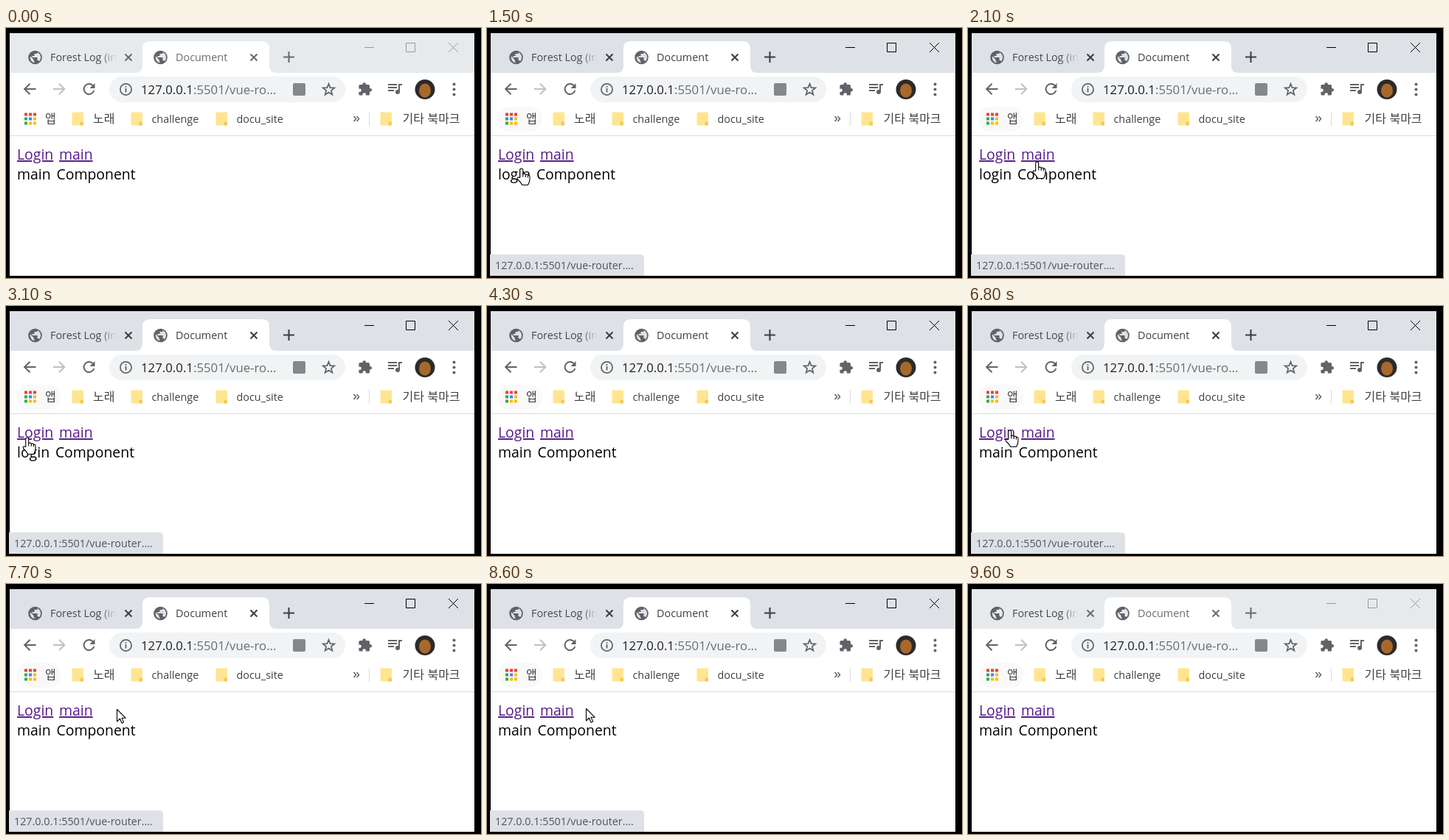
Animation, 644 px wide and 340 px high, one loop 9.7 s. Source, as an HTML page:

```html
<!DOCTYPE html>
<html lang="ko">
<head>
<meta charset="utf-8">
<style>
  html, body { margin: 0; width: 100%; height: 100%; overflow: hidden; background: #000; }
  svg {
    display: block;
    --bar: #dee1e6; --title: #3c4043; --control: #000;
    font: 14.4px "Open Sans", "Noto Sans CJK KR", "Noto Sans CJK", sans-serif;
    fill: #3c4043;
  }
  svg.inactive { --bar: #e7eaed; --title: #696d71; --control: #999; }
  .korean { font: 16px "Noto Sans CJK KR", "Noto Sans CJK", sans-serif; }
  .page { font-size: 19.4px; word-spacing: 2.8px; fill: #000; }
  .link { fill: #551a8b; text-decoration: underline; }
  .bar { fill: var(--bar); }
  .icon { fill: #5f6368; }
  .stroke { fill: none; stroke: #5f6368; stroke-width: 2; }
  .line { fill: none; stroke: var(--control); }
  .cross { fill: none; stroke: var(--title); stroke-width: 2.1; }
  .pointer { fill: #fff; stroke: #000; stroke-width: 1.1; stroke-linejoin: round; }
</style>
</head>
<body>
<svg id="stage" width="644" height="340" viewBox="0 0 644 340">
  <defs>
    <linearGradient id="fade" gradientUnits="userSpaceOnUse" x1="128" x2="150">
      <stop stop-color="#45494d"/>
      <stop offset="1" stop-color="#45494d" stop-opacity="0"/>
    </linearGradient>
    <g id="globe">
      <circle r="9.300"/>
      <path class="bar" d="M-1 7.500A7.500 7.500 0 0 1-6.500-1.800L-2 3v1l1 2zM5.500 5L4 4H3V0H-4V-2h3V-5H3V-7A7.500 7.500 0 0 1 5.500 5z"/>
    </g>
    <path id="back" class="stroke" d="M8 0H-7M0-7.300L-7.300 0 0 7.300"/>
    <g id="folder">
      <rect width="15.500" height="18" rx="1" fill="#ffe591"/>
      <rect x="11" y="13" width="4.500" height="5" rx="1" fill="#f2ca59"/>
    </g>
  </defs>

  <!-- Window and tab strip -->
  <path fill="#fff" d="M5 7h630v330H5z"/>
  <path class="bar" d="M5 7h630v54H5z"/>
  <path fill="#fff" d="M175 61q10 0 10-10V28q0-10 10-10h152q10 0 10 10v23q0 10 10 10z"/>
  <g class="icon">
    <use href="#globe" x="39.500" y="40"/>
    <use href="#globe" x="209.500" y="40"/>
  </g>
  <text x="60" y="45" fill="url(#fade)">Forest Log (in</text>
  <text x="230" y="45" style="fill:var(--title)">Document</text>
  <path class="cross" d="M161.500 35.500l9 9m0-9l-9 9M331.500 35.500l9 9m0-9l-9 9M376 39.500h15M383.500 32v15"/>
  <path class="line" d="M486 26.500h13M542.500 20.500h12v12h-12zM600 20l13 13m0-13l-13 13"/>

  <!-- Toolbar -->
  <rect x="140" y="66" width="320" height="35" rx="17.500" fill="#f1f3f4"/>
  <use href="#back" x="32.500" y="83"/>
  <use href="#back" transform="translate(72 83)scale(-1 1)" opacity=".4"/>
  <g class="icon">
    <g transform="translate(112.500 83)">
      <path class="stroke" d="M5-5A7 7 0 1 0 6.800 2"/>
      <path d="M8-8v7H1z"/>
    </g>
    <g transform="translate(162.500 83.500)">
      <circle class="stroke" r="7.600" style="stroke-width:1.700"/>
      <path d="M-.9-1.500h1.800V4H-.9zM-.9-4.500h1.800v1.800H-.9z"/>
    </g>
    <rect x="389" y="75" width="17" height="17" rx="2" fill="#84888c"/>
    <path id="star" class="stroke" transform="translate(437.500 84)" style="stroke-width:1.700"/>
    <g transform="translate(487 83)">
      <rect x="-8.600" y="-6" width="14.600" height="14.600" rx="1.700"/>
      <circle cx="-1.300" cy="-6.500" r="2.300"/>
      <circle cx="6.700" cy="1.300" r="2.300"/>
      <circle cx="-7.500" cy="1.800" r="2.300" fill="#fff"/>
      <circle cx="-1.300" cy="7.500" r="2.300" fill="#fff"/>
    </g>
    <g transform="translate(527 82)">
      <path class="stroke" d="M-9-5H3M-9-1H3M-9 3h8M6 5V-5h4"/>
      <circle cx="4" cy="5" r="3"/>
    </g>
    <circle cx="607.500" cy="76.500" r="2"/>
    <circle cx="607.500" cy="83.500" r="2"/>
    <circle cx="607.500" cy="90.500" r="2"/>
  </g>
  <text x="183" y="90" font-size="16.800" fill="#202124">127.0.0.1<tspan fill="#6a6e73">:5501/vue-ro...</tspan></text>
  <circle cx="568" cy="83.500" r="13.500" fill="#2c2a2b"/>
  <ellipse cx="568" cy="85" rx="8" ry="9.500" fill="#a8682c"/>

  <!-- Bookmarks -->
  <rect id="appsHover" x="14" y="107" width="61" height="34" rx="17" fill="#f9f9fa"/>
  <g id="apps"></g>
  <use href="#folder" x="89.500" y="114.500"/>
  <use href="#folder" x="169.500" y="114.500"/>
  <use href="#folder" x="284.500" y="114.500"/>
  <use href="#folder" x="507.500" y="114.500"/>
  <g class="korean">
    <text x="53" y="129">앱</text>
    <text x="118" y="129">노래</text>
    <text x="537.500" y="129">기타 북마크</text>
  </g>
  <text x="197.500" y="129">challenge</text>
  <text x="312.500" y="129">docu_site</text>
  <path class="stroke" d="M471.500 120l3 3.500-3 3.500m4-7l3 3.500-3 3.500" style="stroke-width:1.500"/>
  <path d="M492.500 114v19M5 146.500h630" stroke="#d9dbde"/>

  <!-- Page -->
  <g class="page">
    <text class="link" x="15" y="179">Login</text>
    <text class="link" x="72" y="179">main</text>
    <text id="view" x="15" y="206"></text>
  </g>
  <g id="status">
    <path d="M4 308h204q5 0 5 5v24H4z" fill="#dee1e6"/>
    <text x="11" y="328" font-size="14.300" fill="#505459">127.0.0.1:5501/vue-router....</text>
  </g>

  <g class="pointer" id="pointer">
    <path id="arrow" d="M.5.5V17l4-3.800 2.500 6 2.600-1.100-2.500-5.900h5z"/>
    <path id="hand" transform="translate(-1.300 -.5)" d="M-2 13V2.500a2 2 0 0 1 4 0V8q3-1 3.500 1 3-1 3.500 1 2.300-.5 2.300 1.500V15q0 4-2.500 8H1Q-1 19-5 15.500q-1.500-3 1-3zM2 8v4M5.500 9v3.500M8.700 10v3"/>
  </g>
</svg>
<script>
const LOOP = 9700, STEP = 100;
const TRAVEL = 400, CLICK_DELAY = 200, STATUS_LINGER = 300;
const el = id => document.getElementById(id);
const show = (id, on) => { el(id).style.display = on ? "" : "none"; };

// The pointer reaches each point at its time, and may click there
const stop = (at, x, y) => ({ at, x, y });
const press = (at, x, y) => ({ at, x, y, click: at + CLICK_DELAY });
const visits = [
  { leave: 4200, blur: 4900, stops: [
    stop(300, 278, 189), stop(700, 62, 36), press(1000, 36, 183), stop(1500, 48, 191),
    press(2100, 95, 182), press(2800, 30, 179), press(3500, 90, 172), stop(4000, 371, 165)] },
  { leave: 9200, blur: 9300, stops: [
    stop(4800, 66, 240), stop(5100, 178, 105), press(5600, 56, 177), press(6300, 109, 170),
    press(6800, 58, 169), press(7300, 95, 176), stop(7700, 150, 170), stop(8100, 97, 172),
    stop(8500, 134, 169), stop(9000, 598, 76)] }
];
const clicksOf = visit => visit.stops.filter(s => s.click);
const clicks = visits.flatMap(clicksOf);

function pointerAt(t) {
  const visit = visits.find(v => t >= v.stops[0].at && t < v.leave);
  if (!visit) return null;
  const from = visit.stops.findLast(s => s.at <= t);
  const to = visit.stops.find(s => s.at > t) || from;
  const begin = Math.max(from.click || from.at, to.at - TRAVEL);
  const k = t > begin && to !== from ? (t - begin) / (to.at - begin) : 0;
  const ease = k * k * (3 - 2 * k);
  return { x: from.x + (to.x - from.x) * ease, y: from.y + (to.y - from.y) * ease };
}

function linkAt(point) {
  if (!point || point.y < 156 || point.y > 193) return "";
  if (point.x > 14 && point.x < 66) return "login";
  return point.x > 71 && point.x < 118 ? "main" : "";
}

function recentlyOnLink(t) {
  for (let ago = 0; ago <= STATUS_LINGER; ago += STEP) if (linkAt(pointerAt(t - ago))) return true;
  return false;
}

function draw(t) {
  const active = visits.some(v => t >= clicksOf(v)[0].click && t < v.blur);
  const lastClick = clicks.findLast(c => c.click <= t);
  const point = pointerAt(t), link = linkAt(point);
  el("stage").classList.toggle("inactive", !active);
  el("view").textContent = `${linkAt(lastClick) || "main"} Component`;
  show("status", active && recentlyOnLink(t));
  show("appsHover", t >= 800);
  show("pointer", point);
  show("hand", link);
  show("arrow", !link);
  if (point) el("pointer").setAttribute("transform", `translate(${point.x} ${point.y})`);
}

const starPoints = Array.from({ length: 10 }, (_, i) => {
  const radius = i % 2 ? 3.5 : 8.2, angle = i * Math.PI / 5;
  return [radius * Math.sin(angle), -radius * Math.cos(angle)];
});
el("star").setAttribute("d", `M${starPoints.join("L")}z`);

const red = "#ea4335", green = "#34a853", blue = "#4285f4", yellow = "#fbbc05";
el("apps").innerHTML = [red, red, red, green, blue, yellow, green, yellow, yellow].map((color, i) =>
  `<rect x="${25 + i % 3 * 6}" y="${115.5 + Math.floor(i / 3) * 6}" width="4" height="4" fill="${color}"/>`).join("");

const start = performance.now();
function tick() {
  const t = (performance.now() - start) % LOOP;
  draw(Math.floor(t / STEP) * STEP);
  requestAnimationFrame(tick);
}
draw(0);
requestAnimationFrame(tick);
</script>
</body>
</html>
```
